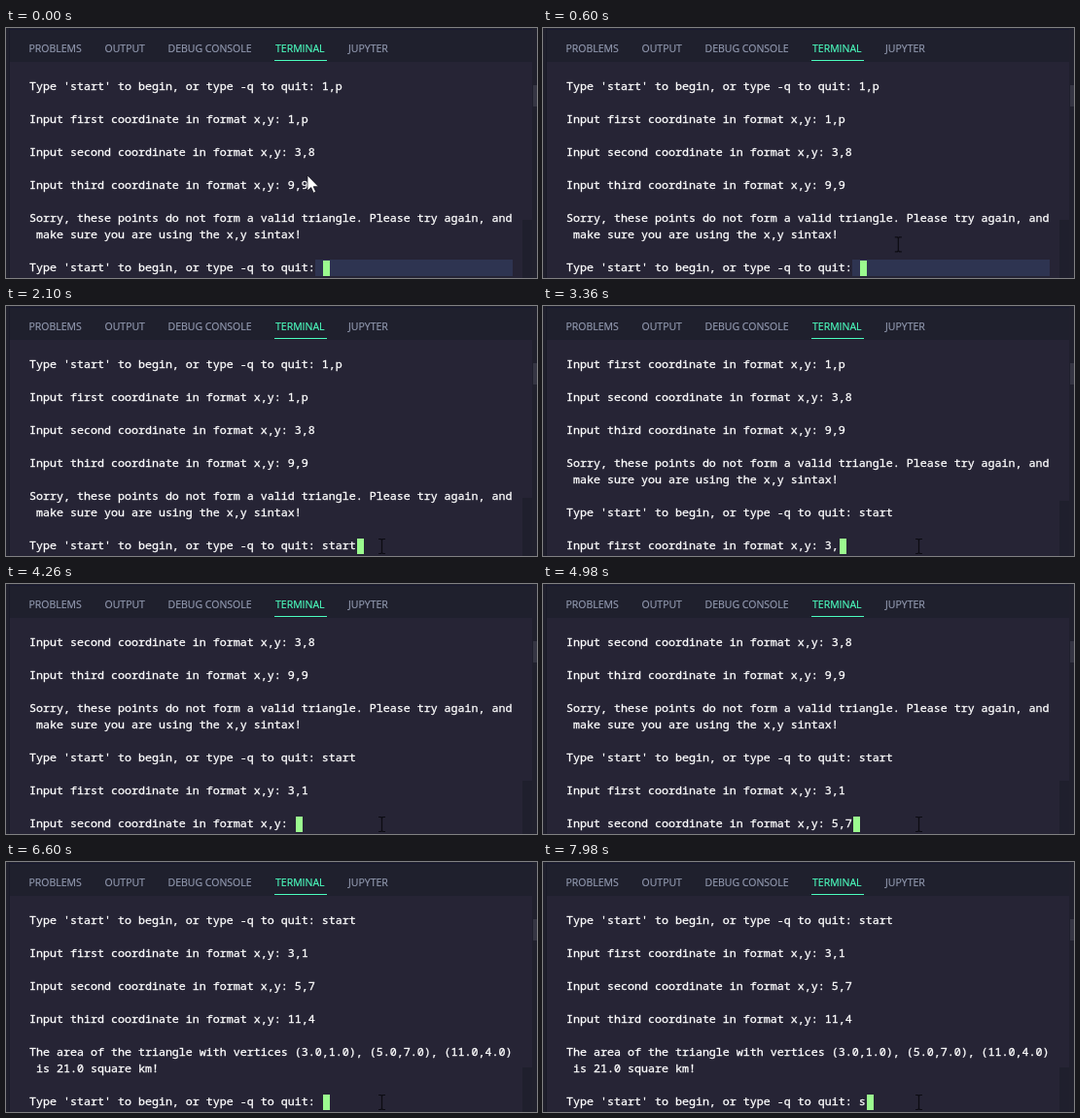
Animation, 546 px wide and 258 px high, one loop 8 s. Source, as an HTML page:

```html
<!DOCTYPE html>
<html lang="en">
<head>
<meta charset="utf-8">
<title>Terminal session</title>
<style>
  html, body { margin: 0; width: 100%; height: 100%; overflow: hidden; background: #262435; }
  #stage { position: relative; width: 546px; height: 258px; overflow: hidden; background: #262435; }
  #stage > *, #tabs span { position: absolute; }
  #header { left: 0; top: 0; width: 546px; height: 35px; background: #1f202d; }
  #top { left: 3px; top: 1px; width: 538px; height: 1px; background: #191a30; }
  #tabs span { top: 13px; font: 10.5px/16px "Open Sans", sans-serif; color: #949bb2; white-space: nowrap; -webkit-text-stroke: .15px; }
  #tabs .active { color: #4dffc0; }
  #underline { left: 276px; top: 33px; width: 54px; height: 1px; background: #4dffc0; }
  #left { left: 0; top: 0; width: 3px; height: 258px; background: #1f1f2c; border-right: 1px solid #191a28; }
  #right { left: 541px; top: 2px; width: 5px; height: 256px; background: #20202d; }
  #marker { left: 542px; top: 59px; width: 4px; height: 22px; background: #353543; }
  #thumb { left: 531px; width: 10px; bottom: 0; background: #1f1f2d; }
  #selection { height: 17px; background: #2e3451; }
  #screen { left: 24px; top: 51px; margin: 0; color: #fff; font: 11.667px/17px "Noto Sans Mono", monospace; -webkit-text-stroke: .3px; }
  #cursor { top: 239.5px; width: 7px; height: 16.5px; background: #9bfb8f; }
  svg { left: 0; top: 0; overflow: visible; }
</style>
</head>
<body>
<div id="stage">
  <div id="header"></div>
  <div id="top"></div>
  <div id="left"></div>
  <div id="right"></div>
  <div id="marker"></div>
  <div id="tabs">
    <span style="left:23.5px">PROBLEMS</span>
    <span style="left:101.5px">OUTPUT</span>
    <span style="left:166.5px">DEBUG CONSOLE</span>
    <span class="active" style="left:277px">TERMINAL</span>
    <span style="left:352px">JUPYTER</span>
  </div>
  <div id="underline"></div>
  <div id="thumb"></div>
  <div id="selection"></div>
  <pre id="screen"></pre>
  <div id="cursor"></div>
  <svg width="546" height="258">
    <path id="arrow" d="M0 0V16L3.7 12.6L6.2 18.2L8.6 17.1L6.2 11.7H11.3Z" fill="#fff" stroke="#16151f" stroke-width=".8"/>
    <path id="beam" d="M-3.5 -7.5H-1L0 -6.5L1 -7.5H3.5M0 -6.5V6.5M-3.5 7.5H-1L0 6.5L1 7.5H3.5" fill="none" stroke="#0c0b12" stroke-width="1.2"/>
  </svg>
</div>
<script>
const LOOP = 8000, ROWS = 12, LEFT = 24, CELL = 7;
const $ = id => document.getElementById(id);

const startPrompt = "Type 'start' to begin, or type -q to quit: ";
const pointPrompt = nth => `Input ${nth} coordinate in format x,y: `;
const history = [
  startPrompt + "1,p", "",
  pointPrompt("first") + "1,p", "",
  pointPrompt("second") + "3,8", "",
  pointPrompt("third") + "9,9", "",
  "Sorry, these points do not form a valid triangle. Please try again, and",
  " make sure you are using the x,y sintax!", "",
  startPrompt
].join("\n");
const result = "The area of the triangle with vertices (3.0,1.0), (5.0,7.0), (11.0,4.0)\n is 21.0 square km!";

// Each entry is [time, text appended to the terminal].
const typed = (text, start, step) => [...text].map((c, i) => [start + i * step, c]);
const reply = (time, text) => [[time, "\n\n" + text]];
const output = [
  ...typed("start", 1720, 80),
  ...reply(2460, pointPrompt("first")),
  ...typed("3,1", 2960, 260),
  ...reply(3900, pointPrompt("second")),
  ...typed("5,7", 4500, 180),
  ...reply(5080, pointPrompt("third")),
  ...typed("11,4", 5720, 160),
  ...reply(6420, result + "\n\n" + startPrompt),
  ...typed("s", 7900, 0)
];

const clamp = x => Math.min(1, Math.max(0, x));
const ease = x => x * x * (3 - 2 * x);
const place = (el, x, y) => el.setAttribute("transform", `translate(${x} ${y})`);

function drawMouse(t) {
  const p = ease(clamp((t - 120) / 720));
  const settle = 2 * ease(clamp((t - 1200) / 500));
  const overText = t >= 480;
  $("arrow").style.display = overText ? "none" : "";
  $("beam").style.display = overText ? "" : "none";
  place($("arrow"), 310 + 74 * p, 152 + 95 * p);
  place($("beam"), 310 + 74.5 * p + settle, 152 + 96 * p);
}

function drawSelection(t) {
  const early = t < 720, x = early ? 318 : LEFT;
  Object.assign($("selection").style, {
    display: t < 1720 ? "" : "none",
    left: x + "px",
    top: (early ? 239 : 222) + "px",
    width: 521 - x + "px"
  });
}

function draw(t) {
  const text = history + output.filter(([time]) => time <= t).map(([, s]) => s).join("");
  const lines = text.split("\n");
  $("screen").textContent = lines.slice(-ROWS).join("\n");
  $("cursor").style.left = LEFT + .5 + CELL * lines.at(-1).length + "px";
  $("thumb").style.top = 198 + Math.round((lines.length - ROWS) * 1.3) + "px";
  drawSelection(t);
  drawMouse(t);
}

const begin = performance.now();
function tick() {
  draw((performance.now() - begin) % LOOP);
  requestAnimationFrame(tick);
}
tick();
</script>
</body>
</html>
```
